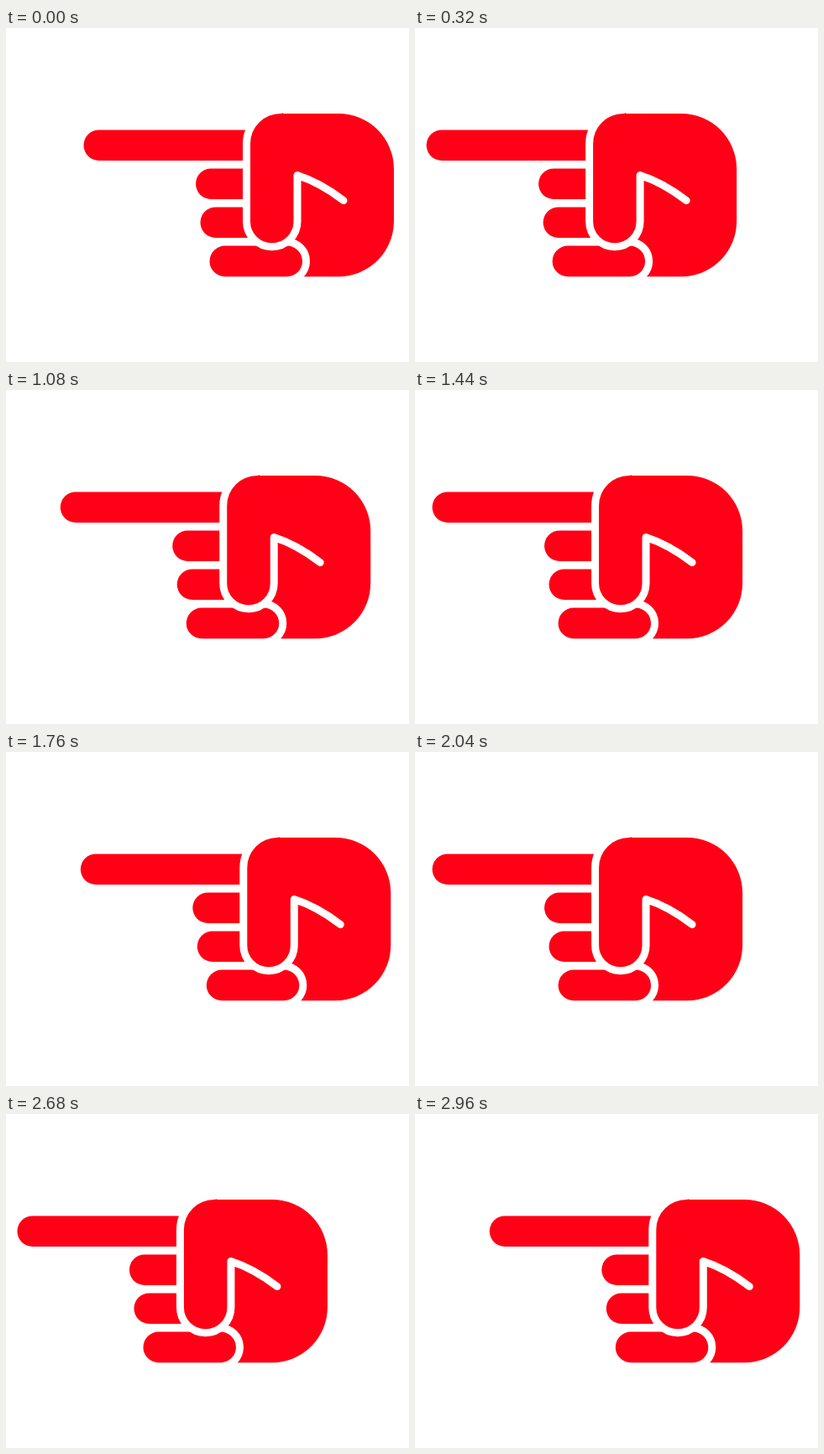
Animation of 480x398 px, one loop 3000 ms. Source, as an HTML page:

```html
<!DOCTYPE html>
<html lang="en">
<head>
<meta charset="utf-8">
<title>Pointing hand</title>
<style>
  html, body { margin: 0; height: 100%; overflow: hidden; background: #fff; }
  svg { display: block; width: 100%; height: 100%; }
  #hand { fill: #ff0016; stroke-linecap: round; stroke-linejoin: round; }
</style>
</head>
<body>
<svg viewBox="0 0 480 398">
  <g id="hand">
    <!-- fingers -->
    <rect x="92.5" y="121.4" width="212" height="36.6" rx="18.3"/>
    <rect x="226" y="167.4" width="90" height="36.6" rx="18.3"/>
    <rect x="231.5" y="213.4" width="84" height="36.6" rx="18.3"/>
    <!-- palm -->
    <path d="M327 102H396A66 66 0 0 1 462 168V230A66 66 0 0 1 396 296.2H340V230H291V138A36 36 0 0 1 327 102Z"/>
    <!-- little finger with its gap -->
    <rect x="242.5" y="259.6" width="110.5" height="36.6" rx="18.3" stroke="#fff" stroke-width="18" paint-order="stroke"/>
    <!-- thumb and crease -->
    <path d="M402 205.5Q374 184 347 175.5V230.5A30.25 30.25 0 0 1 286.5 230.5V138A40.5 40.5 0 0 1 327 97.5" stroke="#fff" stroke-width="9"/>
  </g>
</svg>
<script>
  const hand = document.getElementById('hand');
  const PERIOD = 600, REACH = 80;
  const smooth = u => u * u * (3 - 2 * u);

  function draw() {
    const phase = performance.now() % PERIOD / PERIOD;
    const u = 1 - Math.abs(1 - 2 * phase);   // out and back
    hand.setAttribute('transform', `translate(${-REACH * smooth(u)} 0)`);
    requestAnimationFrame(draw);
  }
  draw();
</script>
</body>
</html>
```
